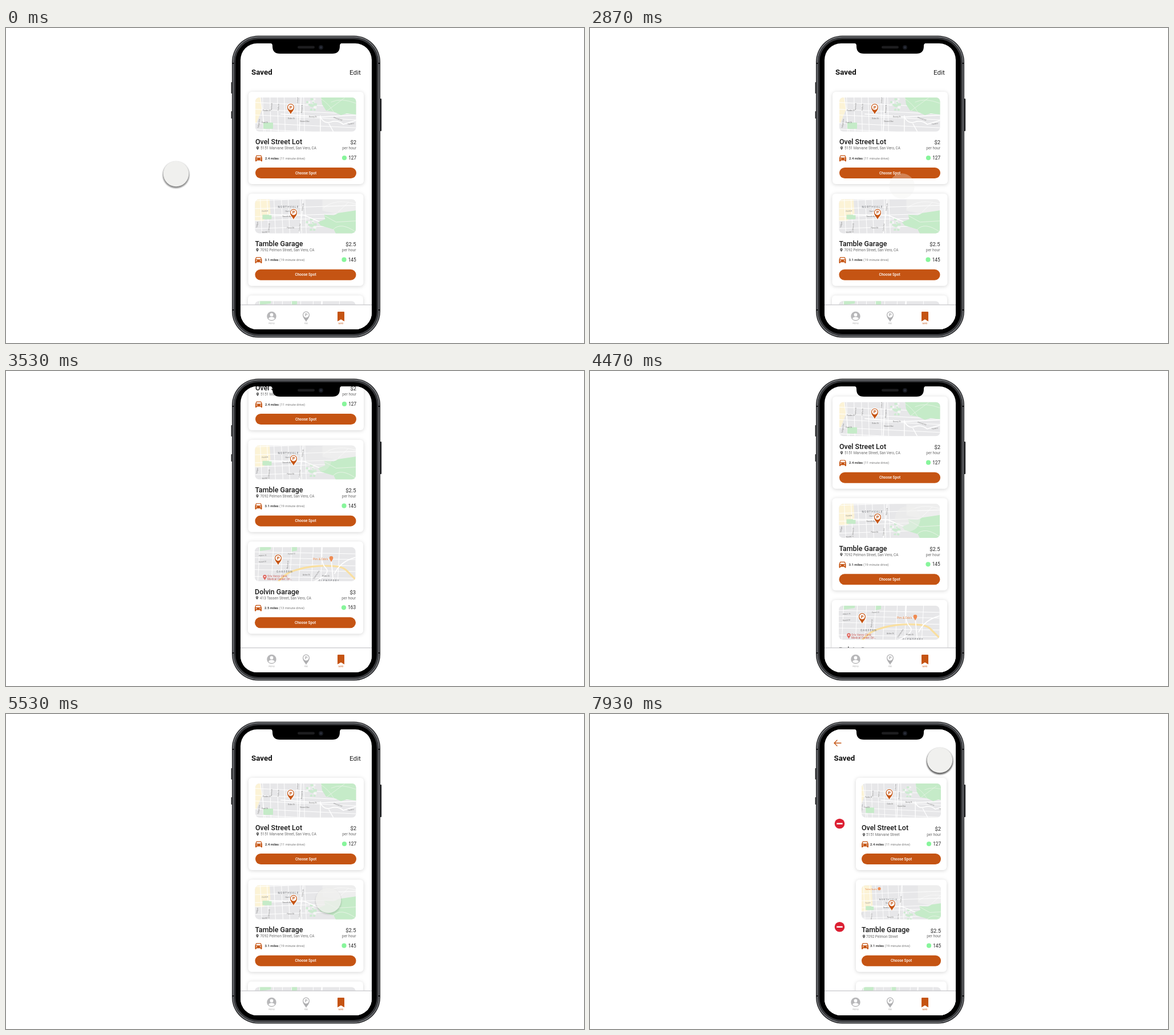
Write an HTML page that moves like this. It is 1013x553 px and loops after 8 s.

```html
<!DOCTYPE html>
<html lang="en">
<head>
<meta charset="utf-8">
<title>Saved parking spots</title>
<style>
  html, body { margin: 0; width: 100%; height: 100%; overflow: hidden; background: #fff; }
  svg { display: block; font-family: Roboto, Arial, sans-serif; }
  .card { filter: drop-shadow(0 1px 3px rgba(0, 0, 0, .17)); }
  .street { font-size: 3.2px; fill: #777; }
  .area { font-size: 4.8px; fill: #6f7276; letter-spacing: 1.1px; }
</style>
</head>
<body>
<svg id="stage" width="1013" height="553" viewBox="0 0 1013 553"></svg>
<script>
const ORANGE = '#c55413', GREEN = '#c5ebc8', LOOP = 8000, PITCH = 178.7;

const spots = [
  { name: 'Ovel Street Lot', street: '5151 Marvane Street', price: '$2', dist: '2.4', mins: 11, free: 127, pin: [62, 17], editPin: [48.5, 16] },
  { name: 'Tamble Garage', street: '7092 Pelmon Street', price: '$2.5', dist: '3.1', mins: 19, free: 145, pin: [67.5, 23], editPin: [53, 32] },
  { name: 'Dolvin Garage', street: '413 Tassen Street', price: '$3', dist: '2.5', mins: 13, free: 163, pin: [41, 19], editPin: [32, 18] }
];

const rect = (x, y, w, h, r, fill, extra = '') =>
  `<rect x="${x}" y="${y}" width="${w}" height="${h}" rx="${r}" fill="${fill}" ${extra}/>`;
const path = (d, fill, extra = '') => `<path d="${d}" fill="${fill}" ${extra}/>`;
const circle = (x, y, r, fill, extra = '') => `<circle cx="${x}" cy="${y}" r="${r}" fill="${fill}" ${extra}/>`;
const line = (d, color, w) => path(d, 'none', `stroke="${color}" stroke-width="${w}" stroke-linecap="round"`);
const text = (x, y, size, fill, str, extra = '') =>
  `<text x="${x}" y="${y}" font-size="${size}" fill="${fill}" ${extra}>${str}</text>`;
const group = (x, y, body, extra = '') => `<g transform="translate(${x} ${y})" ${extra}>${body}</g>`;
const END = 'text-anchor="end"', MID = 'text-anchor="middle"', MEDIUM = 'font-weight="500"';

const label = (x, y, str, turn = 0) =>
  `<text class="street" transform="translate(${x} ${y}) rotate(${turn})">${str}</text>`;
const area = (x, y, str) => `<text class="area" x="${x}" y="${y}">${str}</text>`;

// Parking marker with its head centred on the origin
function marker(x, y, color, halo = true) {
  const shape = 'M0 12.5C-1 8.5-6 6-6 0A6 6 0 1 1 6 0C6 6 1 8.5 0 12.5Z';
  return group(x, y,
    (halo ? path(shape, '#fff', 'stroke="#fff" stroke-width="2.2" opacity=".85"') : '') +
    path(shape, color) + circle(0, 0, 4.8, '#fff') +
    text(.1, 2.7, 7.5, color, 'P', `${MID} font-weight="700"`));
}

const car = (x, y) => group(x, y,
  path('M2.4 0h7.2q.8 0 1 .7L12 4.4V10q0 .8-.8.8h-.7q-.8 0-.8-.8V9H2.3v1q0 .8-.8.8H.8Q0 10.8 0 10V4.4L1.4.7Q1.6 0 2.4 0Z', ORANGE) +
  path('M2.6 1.2h6.8l1 2.9H1.6Z', '#fff') + circle(2.6, 6.3, .9, '#fff') + circle(9.4, 6.3, .9, '#fff'));

// Parallel streets leaning by dx over the height or dy over the width
const down = (xs, dx) => xs.map(x => line(`M${x} -25l${dx} 110`, '#fff', 1)).join('');
const across = (ys, dy) => ys.map(y => line(`M-15 ${y}l210 ${dy}`, '#fff', 1)).join('');
const ground = rect(-15, -25, 215, 110, 0, '#e7e7e9');

const campus = (x, y) => {
  let s = '', seed = 7;
  const rnd = () => (seed = seed * 16807 % 2147483647) / 2147483647;
  for (let i = 0; i < 18; i++)
    s += rect(x + rnd() * 25, y + rnd() * 22, 2 + rnd() * 5, 2 + rnd() * 4, 1, i % 3 ? '#cdebd1' : '#f5f6f5');
  return s;
};

const maps = [
  ground + path('M-15-25H6L12 20 2 45H-15Z', '#fcf3d6') +
  down([12, 25, 38, 50, 72, 84], 3) + down([5], 16) + across([8, 20, 30, 44, 55], 10) +
  campus(79, 0) +
  path('M112-25H200V31L176 30 160 28 150 31 137 25 124 23 117 12Z', GREEN) +
  line('M126 23L156 1M133 8Q150 0 176 10M113 1Q128 10 137 25', '#e9f4e7', .8) +
  rect(14, 44, 17, 11, 1, GREEN) + line('M45 29L114 34 176 31', '#fff', 1.7) +
  line('M114 34Q120 47 132 43T154 47L181 39', '#fff', 1.7) +
  line('M114 32V80M129 46L145 75M81-20L76 80', '#fff', 1.5) +
  label(6, 54, 'Tollgan Ave', -82) + label(29, 22, 'Derrin St', -86) + label(41, 23, 'Hallis St', -86) +
  label(82, 27, 'Benlow St', -86) + label(13, 24, 'Parden St') + label(57, 38, 'Oslen St') +
  label(94, 35, 'Dorvey St') + label(78, 43, 'Stannel Ave') + label(11, 45, 'Carel St') +
  label(137, 36, 'Penwell Rd', 18) + label(162, 48, 'Tavenor', -8) + label(75, 10, 'Colm Ave', -88),

  ground + path('M-15-25H24L27 25 14 38H-15Z', '#fcf3d6') +
  path('M118-25H200V18L146 26 118 20Z', '#eeeeee') +
  line('M120 15Q140-2 176 8M146 22L164 5', '#f8f8f8', 1) +
  down([8, 20, 32, 45, 57, 78, 86], 5) + across([3, 17, 31, 38, 52], -7) +
  campus(79, 32) + rect(13, 27, 16, 8, 1, GREEN) +
  path('M110 40L123 35 121 27 138 28 146 24 200 16V90H156L138 53 115 46Z', GREEN) +
  line('M122 29L142 40 176 38M137 53Q150 39 176 57', '#eaf4e8', .9) +
  line('M25 27L86 28 112 39', '#fff', 1.7) + line('M86-20L82 26 75 80', '#fff', 1.6) +
  area(40, 15.5, 'NORTHVALE') + label(53, 22.5, 'Harth St') + label(48, 31.5, 'Doneth Ave') +
  label(25, 55, 'Mirren St', -85) + label(56, 51, 'Parnel St') + label(84, 20, 'Pelton St', -84) +
  label(79, 56, 'Colm Ave', -86) + label(12, 59, 'Wardel St', -4) + label(12, 22, 'Fennick', -4) +
  label(4, 50, 'Tollgan', -82),

  ground + path('M6-25H31L28 4 8 7Z', GREEN) + path('M62-25H74V6L64 8Z', GREEN) +
  down([10, 34, 50, 66, 82, 104, 120, 150], -6) + across([8, 18, 29, 39, 51], 4) +
  line('M27 80Q46 50 64 43T100 34 136 33 160 40 176 56', '#f9dfa0', 3.2) +
  line('M120-20Q112 25 124 36T100 62M134 22L139 75M176 18Q150 25 140 46', '#fff', 1.7) +
  area(38, 44.5, 'OAKFERN') + area(112, 61, 'GLENDERRY') +
  text(102, 23, 5, '#e5803f', "Pim &amp; Odo's") +
  circle(134, 19, 3.3, '#ef8b52') + path('M131.3 21L134 26 136.7 21Z', '#ef8b52') +
  circle(17.5, 51.5, 3.2, '#e0675f') + path('M15 53.5L17.5 58 20 53.5Z', '#e0675f') + circle(17.5, 51.5, 1.2, '#fff') +
  text(22, 52.5, 4.7, '#c55c58', 'Orla Venns Clinic') + text(22, 57.8, 4.7, '#c55c58', 'Medical Center: Orl...') +
  label(7, 16, 'Webrin St', -4) + label(7, 27, 'Rossel St', -5) + label(58, 13, 'Parnel St', -4) +
  label(84, 50, 'Ashen St') + label(104, 56, 'Clarrow Ave', -55) + label(58, 38, 'Benlow St', -84) +
  label(118, 52, 'Hilden St')
];

const cropped = ['translate(-5 4) scale(.87)', 'translate(-4 13) scale(.87)', 'translate(-4 3) scale(.87)'];

function card(spot, i, edit) {
  const w = edit ? 159 : 202, pad = edit ? 10 : 12, right = edit ? 149 : 189;
  const inner = right - pad, lot = edit ? spot.street : `${spot.street}, San Vero, CA`;
  const sub = edit ? 102.3 : 101.2, clip = edit ? 'cropEdit' : 'crop';
  const [px, py] = edit ? spot.editPin : spot.pin;
  const map = `<g clip-path="url(#${clip})"><g ${edit ? `transform="${cropped[i]}"` : ''}>${maps[i]}</g>` +
    (edit && i === 1 ? text(6, 8, 4, '#e5803f', 'Tolmi Sushi') + circle(31, 6, 2.6, '#ef8b52') : '') +
    marker(px, py, ORANGE) + '</g>';
  return group((edit ? 466 : 425) - (edit ? 0 : i * .5), 112 + i * PITCH,
    rect(0, 0, w, 162, 6, '#fff', 'class="card"') + group(pad, 10, map) +
    text(pad, 92.3, 12.45, '#161616', spot.name, MEDIUM) +
    text(right, edit ? 93 : 92.2, 9.4, '#222', spot.price, END) +
    path('M0 3.8C-.5 2.3-2.2 1.3-2.2-.4A2.2 2.2 0 1 1 2.2-.4C2.2 1.3.5 2.3 0 3.8Z', '#555', `transform="translate(${pad + 4} ${sub - 2.8})"`) +
    circle(pad + 4, sub - 3.2, .8, '#fff') +
    text(pad + (edit ? 8 : 9), sub, 6.35, '#6b6b6b', lot) +
    text(right, sub - (edit ? .5 : 0), 6.7, '#6b6b6b', 'per hour', END) +
    car(pad, 111.5) +
    text(pad + (edit ? 15 : 17), 118.6, 5.9, '#777', `<tspan fill="#222" ${MEDIUM}>${spot.dist} miles</tspan> (${spot.mins} minute drive)`) +
    circle(right - 21, 116, 4.1, '#87f59b') + text(right, 119, 8.2, '#222', spot.free, END) +
    rect(pad, 133, inner, 19, 9.5, ORANGE) +
    text(pad + inner / 2, 144.8, 6.5, '#fff', 'Choose Spot', `${MID} ${MEDIUM}`));
}

const cards = edit => spots.map((s, i) => card(s, i, edit)).join('');
const minus = y => circle(437.5, y, 8.8, '#dc2033') + rect(432.3, y - 1.2, 10.4, 2.4, .6, '#fff');
const page = rect(411, 27, 230, 502, 0, '#fff');

const listPage = page + '<g id="list">' + text(430, 82, 13.4, '#111', 'Saved', 'font-weight="700"') +
  text(602, 82, 11.8, '#222', 'Edit') + cards(false) + '</g>';

const editPage = page + line('M428 51H440M433 46L428 51 433 56', ORANGE, 1.3) +
  text(427.5, 82, 13.4, '#111', 'Saved', 'font-weight="700"') + cards(true) + minus(192.5) + minus(373.8);

const tab = (x, str, color) => text(x, 519.5, 2.9, color, str, MID);
const tabBar = rect(411, 486, 230, 44, 0, '#fff') + rect(411, 485.4, 230, 1.2, 0, '#c6c6c8') +
  circle(465.5, 506, 8.2, '#b7b7b9') + circle(465.5, 503.4, 2.9, '#fff') +
  path('M460 510.2Q461 507.3 465.5 507.3T471 510.2Q469 512.8 465.5 512.8T460 510.2Z', '#fff') +
  marker(526, 503.6, '#aeaeb0', false) +
  path('M582 498H592Q593 498 593 499V515L587 511.5 581 515V499Q581 498 582 498Z', ORANGE) +
  tab(465.5, 'PROFILE', '#aaa') + tab(526, 'FIND', '#aaa') + tab(587, 'SAVED', ORANGE);

const ring = (inset, r, color, w) =>
  rect(396 + inset, 13.5 + inset, 260 - 2 * inset, 530 - 2 * inset, r, 'none', `stroke="${color}" stroke-width="${w}"`);
const body =
  rect(394.6, 95, 3, 20, 1, '#2a2b2d') + rect(394.6, 146, 3, 13, 1, '#2a2b2d') + rect(655, 124, 3.2, 57, 1, '#2a2b2d') +
  rect(396, 13.5, 260, 530, 46, '#202123') + ring(2.2, 44, '#77797d', 1.7) + ring(4.6, 42, '#3c3d40', 2) +
  rect(402.5, 20, 247, 517, 39, '#000') +
  [[396, 61], [396, 494], [652, 61], [652, 494]].map(([x, y]) => rect(x, y, 4, 2, 0, '#151517')).join('');
const notch = path('M463 26.5Q467 27 467 31V32Q467 45 480 45H572Q585 45 585 32V31Q585 27 589 26.5Z', '#000') +
  rect(511, 31.5, 30, 4.6, 2.3, '#1d1d1f') + circle(552, 34, 4, '#17191f') + circle(552, 34, 2, '#2b2f3b');

const stage = document.getElementById('stage');
stage.innerHTML = `<defs>
  <clipPath id="screen">${rect(411, 27, 230, 502, 29, '#000')}</clipPath>
  <clipPath id="crop">${rect(0, 0, 176.5, 59.7, 7, '#000')}</clipPath>
  <clipPath id="cropEdit">${rect(0, 0, 139, 59.7, 7, '#000')}</clipPath>
  <filter id="soft" x="-30%" y="-30%" width="160%" height="160%"><feGaussianBlur stdDeviation="1.1"/></filter>
</defs>${body}<g clip-path="url(#screen)">${listPage}<g id="edit">${editPage}</g>${tabBar}</g>${notch}
<g id="cursor">${circle(0, 2, 23.3, '#000', 'id="shade" filter="url(#soft)"')}${circle(0, 0, 22.3, '#f0f0ee')}</g>`;

const [list, edit, cursor, shade] = ['list', 'edit', 'cursor', 'shade'].map(id => document.getElementById(id));

// Each track is a row of [time, value] stops, eased between neighbours
const tracks = {
  scroll: [[2880, 0], [3500, 170], [3850, 172], [4070, 172], [4770, 0]],
  x: [[1250, 298], [2550, 546], [3400, 548], [4070, 551], [5000, 565], [5750, 565], [6650, 613]],
  y: [[1250, 256], [2500, 322], [2600, 322], [3400, 155], [4070, 155], [4770, 327], [5750, 327], [6650, 81]],
  alpha: [[2500, 1], [2700, .3], [3600, .3], [4070, .5], [5000, .5], [5530, .78], [5800, 1]],
  shade: [[0, .45], [1000, 1], [1400, 1], [2400, .75], [2600, 0], [5000, 0], [5530, .15], [6000, .4], [6700, .6], [7100, .85], [7450, .6]],
  edit: [[7530, 0], [7780, 1]]
};

function at(track, t) {
  const n = track.findIndex(stop => stop[0] > t);
  if (n === 0) return track[0][1];
  if (n < 0) return track[track.length - 1][1];
  const [t0, a] = track[n - 1], [t1, b] = track[n], p = (t - t0) / (t1 - t0);
  return a + (b - a) * p * p * (3 - 2 * p);
}

function draw(now) {
  const t = now % LOOP, v = key => at(tracks[key], t);
  list.setAttribute('transform', `translate(0 ${-v('scroll')})`);
  edit.setAttribute('opacity', v('edit'));
  cursor.setAttribute('transform', `translate(${v('x')} ${v('y')})`);
  cursor.setAttribute('opacity', v('alpha'));
  shade.setAttribute('opacity', v('shade'));
}

const start = performance.now();
function tick() {
  draw(performance.now() - start);
  requestAnimationFrame(tick);
}
tick();
</script>
</body>
</html>
```
